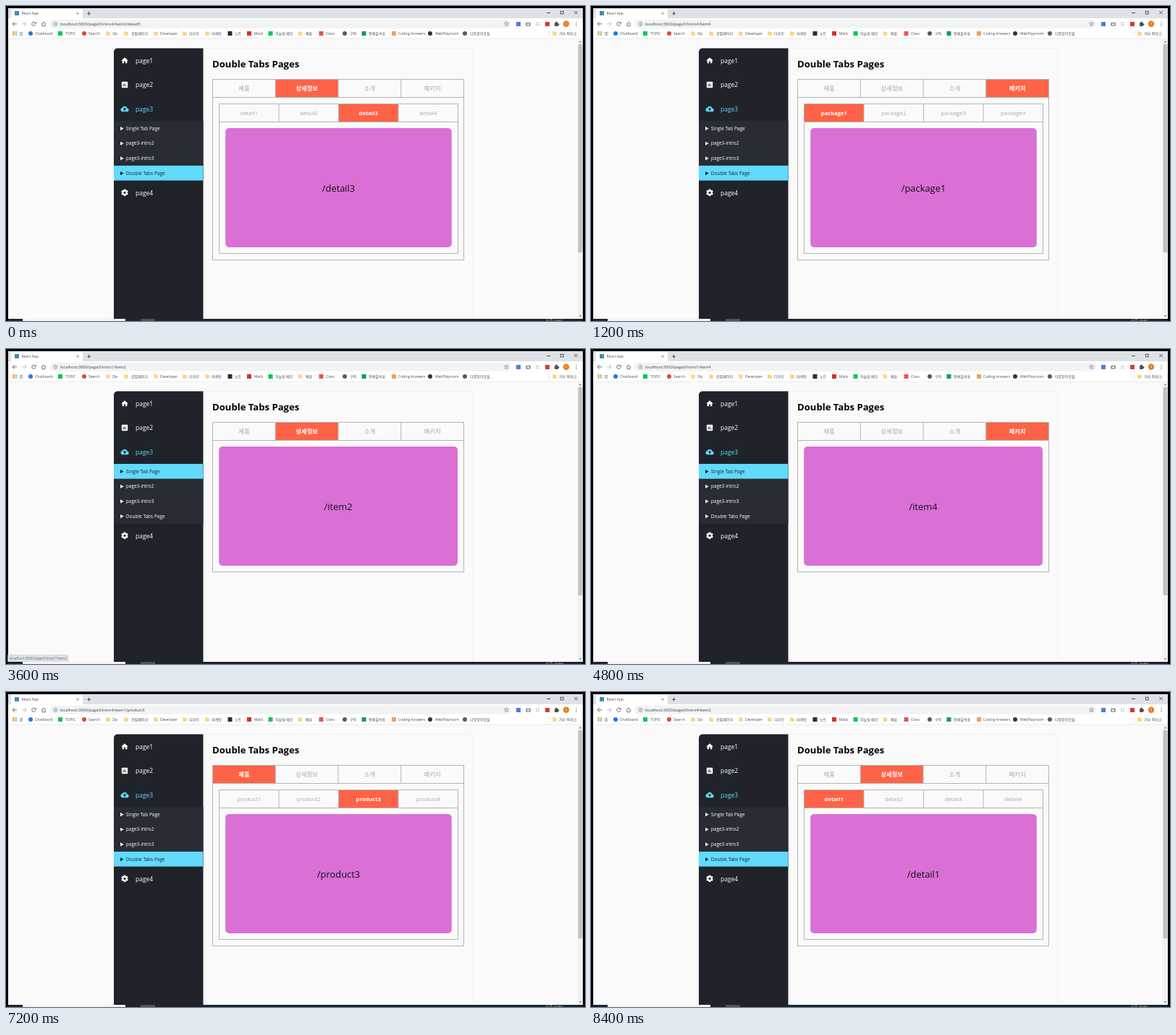
An HTML page with a canvas for the animation above (9600 ms loop, 800 px wide and 436 px high).

```html
<!DOCTYPE html>
<html>
<head>
<meta charset="utf-8">
<title>Tabs demo</title>
<style>
html, body { margin: 0; width: 100%; height: 100%; overflow: hidden; background: #000; }
canvas { display: block; width: 800px; height: 436px; }
</style>
</head>
<body>
<canvas id="stage"></canvas>
<script>
const W = 800, H = 436, STEP = 1200;
const canvas = document.getElementById('stage');
const ratio = window.devicePixelRatio || 1;
canvas.width = W * ratio;
canvas.height = H * ratio;
const ctx = canvas.getContext('2d');
ctx.scale(ratio, ratio);

const FONT = '"Open Sans", "Noto Sans CJK KR", "Noto Sans CJK", sans-serif';
const INK = '#20232a', CYAN = '#61dafb', TOMATO = '#ff6347', ORCHID = '#da70d6';
const LINE = '#b4b4b4', PAPER = '#fafafa', GREY = '#5f6368', FOLDER = '#f8d775';

const OUTER = ['제품', '상세정보', '소개', '패키지'];
const SIDE = ['Single Tab Page', 'page3-intro2', 'page3-intro3', 'Double Tabs Page'];

// Each view: path, side row, outer tab, inner group and tab, hovered link
const VIEWS = [
  { path: 'intro4/item2/detail3', side: 3, tab: 1, group: 'detail', sub: 2 },
  { path: 'intro4/item4', side: 3, tab: 3, group: 'package', sub: 0 },
  { path: 'intro1', side: 0, tab: 0 },
  { path: 'intro1/item2', side: 0, tab: 1, hover: 'intro1/item2' },
  { path: 'intro1/item4', side: 0, tab: 3 },
  { path: 'intro4', side: 3, tab: 0, group: 'product', sub: 0, hover: 'intro4' },
  { path: 'intro4/item1/product3', side: 3, tab: 0, group: 'product', sub: 2 },
  { path: 'intro4/item2', side: 3, tab: 1, group: 'detail', sub: 0 }
];

// kind, colour, icon x, label x, label
const BOOKMARKS = [
  ['disc', '#1877f2', 34, 40, 'Chatboard'],
  ['box', '#03c75a', 75, 82, 'TOPIC'],
  ['disc', '#ea4335', 108, 114, 'Search'],
  ['folder', FOLDER, 141, 147, 'Zip'],
  ['folder', FOLDER, 166, 173, '로컬페이지'],
  ['folder', FOLDER, 207, 213, 'Developer'],
  ['folder', FOLDER, 247, 253, '디자인'],
  ['folder', FOLDER, 278, 284, '마케팅'],
  ['box', '#2b2b38', 309.5, 316, '노트'],
  ['box', '#d93025', 336, 343, 'Mails'],
  ['box', '#03c75a', 365.5, 372, '하늘빛 메모'],
  ['folder', FOLDER, 406.5, 414, '배움'],
  ['box', '#ec5252', 435.5, 442, 'Class'],
  ['disc', '#555a60', 468, 475, '구직'],
  ['box', '#0f9d58', 494.5, 501, '전체출석표'],
  ['box', '#f0a060', 536, 542, 'Coding Answers'],
  ['disc', '#303438', 586, 593, 'WebPlayroom'],
  ['disc', '#555a60', 634, 641, '다정한이웃들'],
  ['folder', FOLDER, 758, 764, '기타 북마크']
];

const HOME = new Path2D('M10 20v-6h4v6h5v-8h3L12 3 2 12h3v8z');
const CHART = new Path2D('M19 3H5c-1.1 0-2 .9-2 2v14c0 1.1.9 2 2 2h14c1.1 0 2-.9 2-2V5c0-1.1-.9-2-2-2zM9 17H7v-7h2v7zm4 0h-2V7h2v10zm4 0h-2v-4h2v4z');
const CLOUD = new Path2D('M19.35 10.04C18.67 6.59 15.64 4 12 4 9.11 4 6.6 5.64 5.35 8.04 2.34 8.36 0 10.91 0 14c0 3.31 2.69 6 6 6h13c2.76 0 5-2.24 5-5 0-2.64-2.05-4.78-4.65-4.96zM14 13v4h-4v-4H7l5-5 5 5h-3z');

function rect(x, y, w, h, color) {
  ctx.fillStyle = color;
  ctx.fillRect(x, y, w, h);
}

function roundPath(x, y, w, h, tl, tr, br, bl) {
  ctx.beginPath();
  ctx.moveTo(x + tl, y);
  ctx.arcTo(x + w, y, x + w, y + h, tr);
  ctx.arcTo(x + w, y + h, x, y + h, br);
  ctx.arcTo(x, y + h, x, y, bl);
  ctx.arcTo(x, y, x + w, y, tl);
  ctx.closePath();
}

function roundRect(x, y, w, h, r, color) {
  roundPath(x, y, w, h, r, r, r, r);
  ctx.fillStyle = color;
  ctx.fill();
}

function disc(x, y, r, color) {
  ctx.beginPath();
  ctx.arc(x, y, r, 0, Math.PI * 2);
  ctx.fillStyle = color;
  ctx.fill();
}

function ring(x, y, r, color, width = 0.8, from = 0, to = Math.PI * 2) {
  ctx.beginPath();
  ctx.arc(x, y, r, from, to);
  ctx.strokeStyle = color;
  ctx.lineWidth = width;
  ctx.stroke();
}

function poly(points, color, width) {
  ctx.beginPath();
  points.forEach(([x, y]) => ctx.lineTo(x, y));
  if (width) {
    ctx.strokeStyle = color;
    ctx.lineWidth = width;
    ctx.stroke();
  } else {
    ctx.fillStyle = color;
    ctx.fill();
  }
}

function frame(x, y, w, h, color = LINE, width = 1) {
  ctx.strokeStyle = color;
  ctx.lineWidth = width;
  ctx.strokeRect(x, y, w, h);
}

// y is the middle of the lowercase letters
function text(str, x, y, size, color, weight = 400, align = 'left') {
  ctx.font = `${weight} ${size}px ${FONT}`;
  ctx.textAlign = align;
  ctx.textBaseline = 'alphabetic';
  ctx.fillStyle = color;
  ctx.fillText(str, x, y + size * 0.34);
}

function glyph(path, x, y, size, color) {
  ctx.save();
  ctx.translate(x - size / 2, y - size / 2);
  ctx.scale(size / 24, size / 24);
  ctx.fillStyle = color;
  ctx.fill(path, 'evenodd');
  ctx.restore();
}

function gear(x, y, color) {
  ctx.save();
  ctx.translate(x, y);
  for (let i = 0; i < 6; i++) {
    rect(-1.3, -4.8, 2.6, 3, color);
    ctx.rotate(Math.PI / 3);
  }
  ctx.restore();
  disc(x, y, 3.7, color);
  disc(x, y, 1.6, INK);
}

function cross(x, y, r, color, width) {
  poly([[x - r, y - r], [x + r, y + r]], color, width);
  poly([[x - r, y + r], [x + r, y - r]], color, width);
}

function arrow(x, y, dir, color) {
  poly([[x - 3 * dir, y], [x + 3 * dir, y]], color, 0.9);
  poly([[x, y - 3], [x + 3 * dir, y], [x, y + 3]], color, 0.9);
}

function star(x, y) {
  const points = [];
  for (let i = 0; i <= 10; i++) {
    const a = -Math.PI / 2 + i * Math.PI / 5, r = i % 2 ? 1.4 : 3.2;
    points.push([x + r * Math.cos(a), y + r * Math.sin(a)]);
  }
  poly(points, GREY, 0.6);
}

function drawWindow() {
  rect(0, 0, W, H, '#000');
  rect(3, 3, 794, 430, PAPER);
  rect(3, 3, 794, 14, '#dee1e6');
  rect(3, 17, 794, 28, '#fff');
  roundPath(7, 4, 99, 13.5, 3, 3, 0, 0);
  ctx.fillStyle = '#fff';
  ctx.fill();
  rect(12, 7, 6, 6, '#3f8fae');
  text('React App', 21.5, 10.3, 5, '#5a4a60');
  cross(99, 10.3, 1.6, GREY, 0.7);
  rect(112, 9.9, 5, 0.8, '#333');
  rect(114.1, 7.8, 0.8, 5, '#333');
  rect(747, 9, 5, 0.8, '#222');
  frame(766.3, 7.2, 3.8, 3.8, '#222', 0.7);
  cross(787.5, 9.2, 2.2, '#222', 0.7);
}

function drawToolbar() {
  arrow(12, 24.8, -1, GREY);
  arrow(25, 24.8, 1, '#b8babd');
  ring(38.3, 24.8, 2.6, GREY, 0.9, 0.3, 5.6);
  poly([[41.6, 21.8], [41.6, 24.5], [39, 24.5]], GREY);
  poly([[49, 25], [52, 22], [55, 25]], GREY, 0.9);
  poly([[50, 24.5], [50, 27.8], [54, 27.8], [54, 24.5]], GREY, 0.9);
  roundRect(60, 18.8, 638, 12, 6, '#f1f3f4');
  ring(68.3, 24.9, 2.5, GREY, 0.6);
  rect(67.95, 24.5, 0.7, 1.8, GREY);
  rect(67.95, 23.3, 0.7, 0.7, GREY);
  star(691.5, 24.8);
  rect(705, 22, 6, 6, '#4a7fd6');
  roundRect(718.3, 22.8, 6.4, 5, 1, '#85898d');
  disc(721.5, 25.3, 1.5, '#fff');
  for (let i = 0; i < 4; i++) rect(732 + i % 2 * 3, 22.5 + (i >> 1) * 3, 1.8, 1.8, '#c3c5c8');
  rect(745, 22, 6, 6, '#d8383c');
  roundRect(758, 23, 5, 5, 0.8, '#4f5357');
  disc(760.5, 22.7, 1.2, '#4f5357');
  disc(763.2, 25.5, 1.2, '#4f5357');
  disc(774, 24.8, 4.2, '#ef7b1a');
  text('s', 774, 24.6, 4.5, '#fff', 400, 'center');
  for (let i = -1; i <= 1; i++) disc(788, 24.8 + i * 2.2, 0.65, GREY);
}

function drawBookmarks() {
  const dots = ['#ea4335', '#fbbc04', '#34a853'];
  for (let i = 0; i < 9; i++) rect(9.4 + i % 3 * 2, 35.2 + Math.floor(i / 3) * 2, 1.4, 1.4, dots[i % 3]);
  text('앱', 18.3, 38, 5.1, '#4a4d52');
  for (const [kind, color, x, labelX, label] of BOOKMARKS) {
    if (kind === 'disc') disc(x, 38, 3, color);
    else if (kind === 'box') rect(x - 3, 35, 6, 6, color);
    else {
      rect(x - 2.8, 35.2, 2.8, 1.2, color);
      roundRect(x - 2.8, 35.9, 5.6, 4.8, 0.5, color);
    }
    text(label, labelX, 38, 5, '#4a4d52');
  }
  rect(750, 35, 0.6, 6, '#d0d2d5');
  rect(3, 44.6, 794, 0.8, '#e4e5e7');
}

function drawScrollbar() {
  rect(790, 45.4, 7, 387.6, '#f1f1f1');
  rect(790.6, 53, 5.8, 288, '#c1c1c1');
  poly([[791.8, 50.3], [793.5, 48.4], [795.2, 50.3]], '#606060');
  poly([[791.8, 428.2], [793.5, 430.1], [795.2, 428.2]], '#606060');
}

function drawSidebar(active) {
  roundPath(149, 58.5, 496, 380, 5, 5, 0, 0);
  ctx.strokeStyle = '#f0f0f0';
  ctx.lineWidth = 1;
  ctx.stroke();
  roundPath(149, 58.5, 123.5, 374.5, 5, 0, 0, 0);
  ctx.fillStyle = INK;
  ctx.fill();

  glyph(HOME, 164, 75.5, 11.5, '#fff');
  glyph(CHART, 164, 109, 11.2, '#fff');
  glyph(CLOUD, 164, 142.5, 11.2, CYAN);
  gear(164, 258.3, '#fff');
  [76, 109.5, 143, 259].forEach((y, i) =>
    text('page' + (i + 1), 179, y, 8.5, i === 2 ? CYAN : '#fff'));

  rect(149, 159, 123.5, 82.5, '#282c34');
  SIDE.forEach((label, i) => {
    const y = 159 + i * 20.65, on = i === active, color = on ? INK : '#fff';
    if (on) rect(149, y, 123.5, 20.6, CYAN);
    poly([[158, y + 8], [162.6, y + 10.6], [158, y + 13.2]], color);
    text(label, 165.8, y + 10.6, 6.5, color);
  });
}

function drawTabs(x, y, w, h, rowH, labels, active, size) {
  const cell = w / 4;
  rect(x + active * cell, y, cell, rowH, TOMATO);
  labels.forEach((label, i) => {
    const on = i === active;
    text(label, x + (i + 0.5) * cell, y + rowH / 2 + 0.4, on ? size * 0.98 : size,
      on ? '#fff' : '#a8a8a8', on ? 700 : 400, 'center');
    if (i) poly([[x + i * cell, y], [x + i * cell, y + rowH]], LINE, 1);
  });
  poly([[x, y + rowH], [x + w, y + rowH]], LINE, 1);
  frame(x, y, w, h);
}

function drawContent(view) {
  text('Double Tabs Pages', 285, 81, 13.1, '#000', 700);
  const nested = Boolean(view.group);
  drawTabs(285.5, 101.5, 347, nested ? 250 : 207, 25, OUTER, view.tab, 8.4);
  if (nested) {
    const labels = [1, 2, 3, 4].map(n => view.group + n);
    drawTabs(294.5, 135.5, 330, 207, 25, labels, view.sub, 7.8);
    roundRect(303.2, 169, 312.6, 165, 5, ORCHID);
    text('/' + labels[view.sub], 459.5, 252.3, 12.9, '#111', 400, 'center');
  } else {
    roundRect(294.2, 135, 329.8, 165, 5, ORCHID);
    text('/item' + (view.tab + 1), 459, 218.3, 12.9, '#111', 400, 'center');
  }
}

function drawStatus(path) {
  const link = 'localhost:3000/page3/' + path;
  ctx.font = `400 4.9px ${FONT}`;
  const w = ctx.measureText(link).width + 4.5;
  roundPath(2.5, 423.7, w, 9.6, 0, 2, 0, 0);
  ctx.fillStyle = '#dee1e6';
  ctx.fill();
  ctx.strokeStyle = '#c4c7cb';
  ctx.lineWidth = 0.6;
  ctx.stroke();
  text(link, 5, 428.4, 4.9, '#6a6e73');
}

function drawTaskbar(late) {
  rect(0, 433, W, 3, '#1a2430');
  rect(0, 433, 3, 3, '#000');
  rect(797, 433, 3, 3, '#000');
  rect(23, 433, 142, 3, '#f4f4f4');
  rect(186, 433, 20, 3, '#4a545e');
  text(late ? '오후 10:50' : '오후 10:51', 770, 436.4, 5.2, '#e8e8e8', 400, 'right');
}

function draw(now) {
  const index = Math.floor(now / STEP) % VIEWS.length;
  const view = VIEWS[index];
  drawWindow();
  drawToolbar();
  text('localhost:3000/page3/' + view.path, 74.8, 24.9, 5.64, '#3c4043');
  drawBookmarks();
  drawScrollbar();
  drawSidebar(view.side);
  drawContent(view);
  if (view.hover) drawStatus(view.hover);
  drawTaskbar(index >= 2 && index < 6);
}

const start = performance.now();
function tick() {
  draw(performance.now() - start);
  requestAnimationFrame(tick);
}
tick();
</script>
</body>
</html>
```
